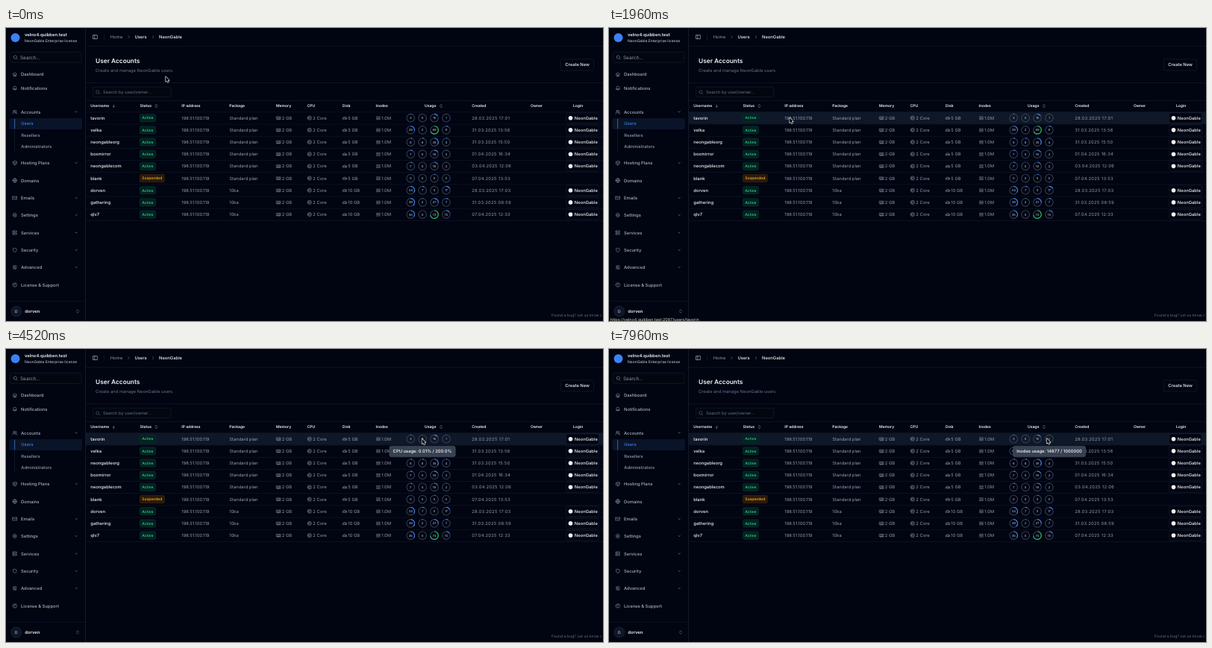
Write an HTML page with a canvas that moves like this. It is 800 px wide and 393 px high and loops after 8000 ms.

```html
<!DOCTYPE html>
<html lang="en">
<head>
<meta charset="utf-8">
<title>User Accounts</title>
<style>
  html, body { margin: 0; width: 100%; height: 100%; overflow: hidden; background: #010411; }
  canvas { display: block; width: 800px; height: 393px; }
</style>
</head>
<body>
<canvas id="stage"></canvas>
<script>
const W = 800, H = 393, LOOP = 8000;
const canvas = document.getElementById('stage');
const ctx = canvas.getContext('2d');
const ratio = window.devicePixelRatio || 1;
canvas.width = W * ratio;
canvas.height = H * ratio;

const SM = 5.83, XS = 5;
const C = {
  bg: '#010411', line: '#141c2c', edge: '#1e283a', field: '#02060f', active: '#0a1428',
  white: '#f1f5f9', text: '#cbd5e1', muted: '#929dae', dim: '#64748b',
  blue: '#3b82f6', green: '#22c55e', tip: '#374151', hover: '#0f1828', track: '#333f56'
};
const BRAND = 'NeonGable', HOST = 'velno4.quibben.test', IP = '198.51.100.119';

const ICON = {
  home: 'M3 11L12 3l9 8M5 9v12h14V9M10 21v-7h4v7',
  bell: 'M5 17V10a7 7 0 0 1 14 0v7zM3 17h18M10 21h4',
  users: 'M5 8a4 4 0 1 0 8 0a4 4 0 1 0-8 0M2 21v-3q0-4 4-4h6q4 0 4 4v3M16 4a4 4 0 0 1 0 8M18 14q4 1 4 4v3',
  plans: 'M12 2L3 7v10l9 5 9-5V7zM3 7l9 5 9-5M12 12v10',
  globe: 'M2 12a10 10 0 1 0 20 0a10 10 0 1 0-20 0M2 12h20M12 2q-9 10 0 20q9-10 0-20',
  mail: 'M2 5h20v14H2zM2 6l10 8 10-8',
  gear: 'M8 12a4 4 0 1 0 8 0a4 4 0 1 0-8 0M12 2l8 5v10l-8 5-8-5V7z',
  server: 'M3 3h18v7H3zM3 14h18v7H3zM7 6.5h1M7 17.5h1',
  shield: 'M12 2l8 3v7q0 7-8 10q-8-3-8-10V5z',
  tools: 'M3 5h10M18 5h3M13 2v6M3 12h4M11 12h10M8 9v6M3 19h11M18 19h3M15 16v6',
  help: 'M2 12a10 10 0 1 0 20 0a10 10 0 1 0-20 0M9 9q0-3 3-3t3 3q0 2-3 4M12 17v1',
  search: 'M3 11a8 8 0 1 0 16 0a8 8 0 1 0-16 0M17 17l5 5',
  panel: 'M2 3h20v18H2zM9 3v18',
  down: 'M6 9l6 6 6-6',
  right: 'M9 5l7 7-7 7',
  sort: 'M6 9l6-6 6 6M6 15l6 6 6-6',
  arrowDown: 'M12 4v15M6 13l6 6 6-6',
  memory: 'M2 6h20v11H2zM7 9v4M12 9v4M17 9v4M5 17v3M10 17v3M14 17v3M19 17v3',
  cpu: 'M2 12a10 10 0 1 0 20 0a10 10 0 1 0-20 0M8 8h8v8H8z',
  disk: 'M2 13l4-6h12l4 6v5H2zM2 13h20M16 15.5h2',
  inodes: 'M2 5h4M9 5h13M2 10h20M2 15h4M9 15h13M2 20h20'
};
for (const name in ICON) ICON[name] = new Path2D(ICON[name]);

const ROW_TOP = 112.6, ROW_H = 16.17;
const rows = [
  ['tavorin', 'Standard plan', 5, '28.03.2025 17:01', [3, 0, 15, 1]],
  ['velka', 'Standard plan', 5, '31.03.2025 13:56', [29, 2, 69, 9]],
  ['neongableorg', 'Standard plan', 5, '31.03.2025 15:50', [6, 6, 35, 4]],
  ['boxmirror', 'Standard plan', 5, '01.04.2025 16:34', [7, 0, 16, 2]],
  ['neongablecom', 'Standard plan', 5, '03.04.2025 12:06', [7, 0, 16, 2]],
  ['blank', 'Standard plan', 5, '07.04.2025 13:53', [0, 0, 5, 0]],
  ['dorven', '10ka', 10, '28.03.2025 17:03', [34, 7, 0, 17]],
  ['gathering', '10ka', 10, '31.03.2025 08:59', [39, 2, 27, 7]],
  ['qlv7', '10ka', 10, '07.04.2025 12:33', [35, 0, 73, 15]]
];
const columns = [
  ['Username', 113.3], ['Status', 179.5], ['IP address', 235.3], ['Package', 299.3],
  ['Memory', 362], ['CPU', 403.5], ['Disk', 451], ['Inodes', 495.5], ['Usage', 561],
  ['Created', 624.2], ['Owner', 703], ['Login', 760]
];
// label, centre y, icon, has chevron
const menu = [
  ['Dashboard', 62, 'home'], ['Notifications', 80.5, 'bell'], ['Accounts', 112.5, 'users', true],
  ['Hosting Plans', 181, 'plans', true], ['Domains', 204.5, 'globe'], ['Emails', 228, 'mail', true],
  ['Settings', 251, 'gear', true], ['Services', 274.5, 'server', true], ['Security', 298, 'shield', true],
  ['Advanced', 321, 'tools', true], ['License & Support', 344.5, 'help']
];
// pointer keys: time, x, y
const path = [
  [40, 214, 65.2], [800, 123.5, 120], [1660, 123.5, 120], [2500, 528, 121.5], [2760, 541.7, 120.3],
  [3920, 541.7, 120.3], [4360, 557.5, 120.5], [5600, 557.5, 120.5], [6080, 571.7, 120],
  [7280, 571.7, 120], [7760, 586.7, 120]
];
// text, centre x, top, fade-in start, fade-out start
const tips = [
  ['Manage account', 135, 99.2, 900, 1740],
  ['Memory usage: 22.81MiB / 768MiB', 542, 130.2, 2860, 4000],
  ['CPU usage: 0.01% / 200.0%', 558, 130.2, 4300, 5720],
  ['Disk usage: 0.75 GiB / 5.00 GiB', 574, 130.2, 6090, 7400],
  ['Inodes usage: 14877 / 1000000', 590, 130.2, 7700, 9000]
];

const clamp = v => Math.max(0, Math.min(1, v));
const ease = v => v * v * (3 - 2 * v);

function text(str, x, cy, size, color, weight = 400, align = 'left', spacing = 0) {
  ctx.font = `${weight} ${size}px Inter, sans-serif`;
  ctx.letterSpacing = spacing + 'px';
  ctx.textAlign = align;
  ctx.fillStyle = color;
  ctx.fillText(str, x, cy + size * 0.36);
}

function box(x, y, w, h, r, fill, stroke) {
  ctx.beginPath();
  ctx.roundRect(x, y, w, h, r);
  if (fill) { ctx.fillStyle = fill; ctx.fill(); }
  if (stroke) { ctx.strokeStyle = stroke; ctx.lineWidth = 0.5; ctx.stroke(); }
}

function rect(x, y, w, h, color) {
  ctx.fillStyle = color;
  ctx.fillRect(x, y, w, h);
}

function disc(x, y, r, color) {
  ctx.fillStyle = color;
  ctx.beginPath();
  ctx.arc(x, y, r, 0, Math.PI * 2);
  ctx.fill();
}

function icon(name, cx, cy, size, color, weight = 2) {
  ctx.save();
  ctx.translate(cx - size / 2, cy - size / 2);
  ctx.scale(size / 24, size / 24);
  ctx.strokeStyle = color;
  ctx.lineWidth = weight;
  ctx.lineCap = ctx.lineJoin = 'round';
  ctx.stroke(ICON[name]);
  ctx.restore();
}

function ring(x, y, value) {
  const start = -Math.PI / 2;
  ctx.lineWidth = 1.1;
  ctx.lineCap = 'butt';
  ctx.strokeStyle = C.track;
  ctx.beginPath();
  ctx.arc(x, y, 5.3, 0, Math.PI * 2);
  ctx.stroke();
  if (value) {
    ctx.strokeStyle = value > 60 ? C.green : C.blue;
    ctx.beginPath();
    ctx.arc(x, y, 5.3, start, start + Math.PI * 2 * value / 100);
    ctx.stroke();
  }
  text(value, x, y, 4.17, C.text, 400, 'center');
}

function sidebar() {
  disc(12.5, 13, 6, C.blue);
  text(HOST, 25, 9.3, SM, C.white, 600);
  text(BRAND + ' Enterprise license', 25, 17, XS, C.text);
  box(5.2, 32.3, 96, 14, 2.5, C.field, C.edge);
  icon('search', 12.5, 39.3, 6.5, C.muted);
  text('Search...', 19, 39.3, 6.4, C.muted);

  box(4.5, 121, 97.5, 15, 2, C.active);
  rect(11.5, 121, 0.5, 45, C.edge);
  rect(11.4, 122, 0.7, 13, C.blue);
  text('Users', 20.3, 128.3, SM, C.blue, 500);
  text('Resellers', 20.3, 143.5, SM, C.muted, 500);
  text('Administrators', 20.3, 158.6, SM, C.muted, 500);
  for (const [label, y, name, chevron] of menu) {
    icon(name, 11.8, y, 6.6, C.muted);
    text(label, 20, y, SM, '#a9b4c3', 500);
    if (chevron) icon('down', 94.2, y, 4.6, C.muted, 3);
  }

  rect(0, 366, 106.6, 0.5, C.line);
  box(6.5, 372.7, 14.6, 14.6, 7.3, '#0e1627', C.edge);
  text('D', 13.8, 380, XS, C.text, 500, 'center');
  text('dorven', 25.3, 380, SM, C.white, 600);
  icon('sort', 96, 380, 6, C.muted);
  rect(106.4, 0, 0.6, H, C.edge);
}

function header() {
  icon('panel', 119.6, 12, 6.6, C.text);
  rect(131.4, 8, 0.5, 8, C.edge);
  text('Home', 139.7, 12, SM, C.muted, 400);
  icon('right', 164.5, 12, 5.5, C.muted);
  text('Users', 172.4, 12, SM, C.white, 500);
  icon('right', 197, 12, 5.5, C.muted);
  text(BRAND, 205, 12, SM, C.white, 500);
  rect(107, 24, 693, 0.6, C.line);

  text('User Accounts', 120, 44.5, 8.33, C.white, 600);
  text(`Create and manage ${BRAND} users.`, 120, 56.5, SM, C.dim);
  box(743.3, 41.8, 44.5, 15.2, 2.5, null, C.edge);
  text('Create New', 765.6, 49.4, SM, C.white, 500, 'center');
  rect(107, 73.4, 693, 0.6, C.line);

  box(116.6, 79.2, 104.5, 13.4, 2.5, C.field, C.edge);
  icon('search', 123, 86, 6.2, C.dim);
  text('Search by user/owner...', 130, 86, SM, C.dim);
  rect(107, 97, 693, 0.6, C.line);
}

function badge(label, y, w, fill, edge, color) {
  box(179.3, y - 5.2, w, 10.4, 1.8, fill, edge);
  text(label, 179.3 + w / 2, y, XS, color, 500, 'center');
}

function table(hovered) {
  for (const [label, x] of columns) text(label, x, 104.6, XS, C.white, 600);
  icon('arrowDown', 144.3, 104.8, 4.8, C.text);
  icon('sort', 201.3, 104.6, 5.5, C.text);
  icon('sort', 583, 104.6, 5.5, C.text);

  rows.forEach(([name, plan, disk, created, usage], i) => {
    const top = ROW_TOP + i * ROW_H, y = top + ROW_H / 2;
    const suspended = i === 5;
    if (hovered && i === 0) rect(107, top, 693, ROW_H, C.hover);
    rect(107, top, 693, 0.5, C.line);
    text(name, 113.3, y, SM, C.white, 500);
    if (suspended) badge('Suspended', y, 33, '#2a1a08', '#452b0a', '#f5b133');
    else badge('Active', y, 21.2, '#03221f', '#063d35', '#34d399');
    text(IP, 235.3, y, SM, C.muted);
    text(plan, 299.3, y, SM, C.muted);
    icon('memory', 365.3, y, 6.6, C.muted);
    text('2 GB', 369.7, y, SM, C.muted);
    icon('cpu', 406.8, y, 6.4, C.muted);
    text('2 Core', 411.2, y, SM, C.muted);
    icon('disk', 454, y, 6.2, C.muted);
    text(disk + ' GB', 458.3, y, SM, C.muted);
    icon('inodes', 498.9, y, 6, C.muted);
    text('1.0M', 503.2, y, SM, C.muted);
    usage.forEach((value, k) => ring(542.2 + k * 15.9, y, value));
    text(created, 624.2, y, SM, C.muted, 400, 'left', 0.28);
    if (!suspended) {
      box(750.7, y - 6.8, 43.6, 13.6, 2.2, C.bg, C.edge);
      disc(756.5, y, 2.8, C.white);
      text(BRAND, 761.8, y, SM, C.white, 500);
    }
  });
  rect(107, ROW_TOP + rows.length * ROW_H, 693, 0.5, C.line);
  text('Found a bug? Let us know', 731, 385.6, XS, C.dim, 400, 'left', 0.08);
  icon('right', 797, 385.6, 4.5, C.dim, 3);
}

function tooltip(label, x, top, alpha) {
  ctx.globalAlpha = alpha;
  ctx.font = `500 ${SM}px Inter, sans-serif`;
  ctx.letterSpacing = '0px';
  const w = ctx.measureText(label).width + 9.6;
  box(x - w / 2, top, w, 14.4, 2.5, C.tip, '#4b5563');
  text(label, x, top + 7.2, SM, '#fff', 500, 'center');
  ctx.globalAlpha = 1;
}

function statusBar(t) {
  if (t < 820 || t >= 2520) return;
  const page = t < 2060 ? 'users/' + rows[0][0] : 'plans#Standard plan';
  ctx.globalAlpha = clamp((2540 - t) / 130);
  text(`https://${HOST}:2087/${page}`, 1.6, 391, 5.42, '#d5d2bd');
  ctx.globalAlpha = 1;
}

function pointerAt(t) {
  let from = path[0];
  for (const to of path) {
    if (t < to[0]) {
      const k = to === from ? 0 : ease(clamp((t - from[0]) / (to[0] - from[0])));
      return [from[1] + (to[1] - from[1]) * k, from[2] + (to[2] - from[2]) * k];
    }
    from = to;
  }
  return [from[1], from[2]];
}

const arrow = new Path2D('M0 0V6.7L1.6 5.3L2.7 7.8L3.9 7.3L2.8 4.9H4.9Z');
const hand = new Path2D('M-.7 0Q0-.8.7 0V2.6L3.2 3.2Q3.9 3.4 3.7 4.2L3 7.2H-.5L-2.3 4.5Q-2.2 3.5-.7 4.4Z');

function pointer(x, y, onLink) {
  ctx.save();
  ctx.translate(x, y);
  ctx.lineWidth = 1.2;
  ctx.lineJoin = 'round';
  ctx.strokeStyle = '#f5f5f5';
  ctx.fillStyle = '#05070d';
  const shape = onLink ? hand : arrow;
  ctx.stroke(shape);
  ctx.fill(shape);
  ctx.restore();
}

function draw(now) {
  const t = now % LOOP;
  const [x, y] = pointerAt(t);
  const inRow = y > ROW_TOP;
  const onLink = inRow && ((x > 113 && x < 137) || (x > 299 && x < 338));

  ctx.setTransform(ratio, 0, 0, ratio, 0, 0);
  ctx.textRendering = 'geometricPrecision';
  rect(0, 0, W, H, C.bg);
  sidebar();
  header();
  table(inRow);
  statusBar(t);
  for (const [label, tx, top, start, end] of tips) {
    const alpha = Math.min(ease(clamp((t - start) / 160)), clamp(1 - (t - end) / 140));
    if (alpha > 0) tooltip(label, tx, top, alpha);
  }
  pointer(x, y, onLink);
  requestAnimationFrame(draw);
}
requestAnimationFrame(draw);
</script>
</body>
</html>
```
